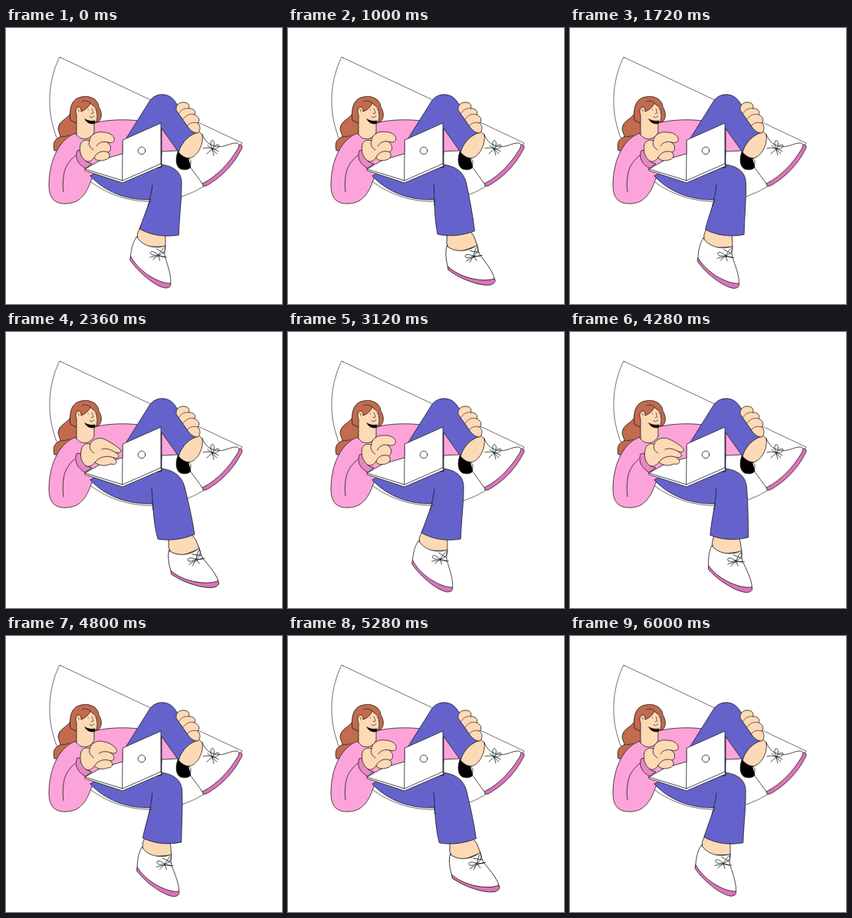
Recreate the animation shown at these times as an HTML page. Size 360 by 360 pixels, loop 6.04 s.

```html
<!DOCTYPE html>
<html lang="en">
<head>
<meta charset="utf-8">
<title>Working on a laptop</title>
<style>
  html, body { margin: 0; width: 100%; height: 100%; overflow: hidden; background: #fff; }
  svg { display: block; width: 100vw; height: 100vh; }
  path, circle { stroke: #111; stroke-width: .75; stroke-linejoin: round; stroke-linecap: round; }
  .white { fill: #fff; }
  .pink { fill: #fca4da; }
  .cuff { fill: #e985c6; }
  .sole { fill: #dd74ba; }
  .blue { fill: #6563cb; }
  .skin { fill: #fdd9b5; }
  .hair { fill: #c26b4e; }
  .ink { fill: #000; }
  .line { fill: none; }
  .thin { stroke-width: .6; }
</style>
</head>
<body>
<svg viewBox="0 0 360 360">
  <!-- seat -->
  <path class="white thin" d="M71 38.500L308 150A131 131 0 0 1 69 39.500Q69 37.500 71 38.500Z"/>

  <!-- sweater -->
  <path class="hair" d="M86 108C80 121 69 119 68 132C69 137 71 140 71 142C62 145 61 152 63 160L82 160L100 140V105Z"/>
  <path class="line thin" d="M71 142C75 141 79 142 82 140"/>
  <path class="pink" d="M92 137C72 142 56 170 56 205C56 226 68 230 80 229C98 228 106 214 112 196L200 196L203 161L224 160L228 150L205 124L172 121C160 119 132 119 115 124Z"/>

  <!-- head -->
  <path class="hair" d="M84 120C82 104 86 92 98 90C110 87 121 94 121 103C125 109 126 117 121 122L115 123L92 124Z"/>
  <path class="skin" d="M92 139V113C90 109 91 103 95 103C97 103 98 106 98 109C103 107 108 103 110 98C112 101 118 103 118 107L119 114C119 119 118 123 115 124V136C110 147 97 147 92 139Z"/>
  <path class="ink" d="M103 119C107 121 111 122 116 121L115.500 124.500C110 126 105 123 103 119Z"/>
  <path class="line thin" d="M112 105L114 111L111 111.500M109 116Q112 118 115 115M107 106L108 107M116 105.500L116.500 106.500M110 98C107 95 103 94 99 96M94 106Q96 107 95 109"/>

  <!-- hanging leg -->
  <g id="foot">
    <path class="skin" d="M176 256L171 268V285H207.500V272L204 260Z"/>
    <path class="sole" d="M162 297L161 302C166 309 172 317 182 325C190 332 200 338 207 339C212 339 215 337 214 333Z"/>
    <path class="white" d="M170 272C166 277 163 286 162 297C166 306 175 315 184 321.500C194 328 204 333 214 333C215 324 211 312 208 302C205 295 207 289 207.500 284C197 288 178 286 170 272Z"/>
    <path class="line" d="M198 296C191 289 187 291 188 294C190 297 195 296 198 296C202 291 205 286 207 286C208 291 203 295 198 296L191 302M198 296L206 299M187 299C193 297 202 297 209 299M198 296L200 303M196 288L206 294"/>
  </g>
  <path id="pants" class="blue"/>
  <path id="fold" class="line"/>

  <!-- raised leg -->
  <path class="sole" d="M305 152C309 153 309 156 306 160C297 178 281 195 261 206L257 206L256 202Z"/>
  <path class="white" d="M256 139C260 148 264 152 273 154C284 157 291 150 300 150C304 150 305 153 302 158C291 176 276 193 256 203C251 196 246 189 240 181C242 175 241 171 238 170C246 166 254 156 256 139Z"/>
  <path class="ink" d="M226 158C220 168 221 181 228 184C234 186 240 184 241 181L237 168Z"/>
  <path class="skin" d="M225 162C230 168 236 171 242 169C251 165 258 151 256 139L250 134L230 144Z"/>
  <path class="blue" d="M153 150L185 99C191 88 199 86 207 87C214 88 219 93 222 98L251 136C240 139 230 147 225 162L203 131V182H153Z"/>
  <path class="line" d="M269 158C265 150 268 145 270 147C273 150 271 154 269 158C274 151 278 151 278 154C277 157 273 158 269 158L262 164M269 158L271 166M257 157C263 155 271 157 277 161M263 153L275 164"/>

  <!-- hand holding the shin -->
  <path class="skin" d="M222 107C221 100 227 96 233 97C239 98 240 102 238 105C244 104 249 109 246 113C251 115 254 120 250 124C254 127 254 134 250 137C245 137 241 134 238 130Z"/>
  <path class="line thin" d="M238 105C233 104 228 107 226 111M246 113C240 111 234 114 231 119M250 124C244 122 239 124 236 128"/>

  <!-- laptop and typing hand -->
  <path class="white" d="M103 184L124 172L152 164L202 177L203 180L152 202L103 186Z"/>
  <path id="cuff" class="cuff"/>
  <path id="sleeve" class="line"/>
  <path id="hand" class="skin"/>
  <path id="fingers" class="line"/>
  <path class="white" d="M152.500 146L202 124V177L152 199Z"/>
  <path class="line" d="M103 184L152 199"/>
  <circle class="white" cx="177" cy="160" r="4.800"/>
</svg>
<script>
const LOOP = 6040, STEP = 40;
const SWING = LOOP / 4, TYPE = LOOP / 3;
const BACK = 50, FRONT = 835;

// Each part blends between two poses with matching numbers.
const legPoses = {
  pants: [
    'M110 193C130 215 160 225 189 224L185 232C181 243 177 253 174 262C190 271 208 273 225 270C226 245 229 225 229 202C229 187 218 180 202 178L150 175Z',
    'M110 193C130 215 160 225 191 224L192 232C193 246 195 259 198 270C214 273 232 270 246 264C243 243 238 222 233 202C229 187 218 180 202 178L150 175Z'
  ],
  fold: [
    'M191 205C190 214 188 222 185 232',
    'M190 204C191 214 191 222 192 232'
  ]
};
const armPoses = {
  cuff: [
    'M93 160C90 167 92 177 104 183L112 177C104 176 98 168 98 160Z',
    'M92 159C89 166 91 176 103 183L112 177C104 176 98 168 98 159Z'
  ],
  sleeve: [
    'M91 166C81 174 76 183 75 194C74 202 74 209 75 214',
    'M89 166C80 174 76 183 75 192C74 201 74 209 75 215'
  ],
  hand: [
    'M105 174C98 170 95 161 97 152C98 147 104 145 109 147C109 140 118 134 127 136C136 136 143 142 141 147C140 150 136 150 132 149C138 153 138 160 133 162C137 166 135 171 129 172C123 174 117 173 115 169C112 173 109 175 105 174Z',
    'M105 175C97 170 96 160 99 151C101 146 106 145 110 146C113 139 123 136 131 141C138 145 143 148 149 153C152 157 147 159 143 157C150 162 147 166 140 164C148 170 143 174 137 172C128 176 121 174 116 170C113 174 109 176 105 175Z'
  ],
  fingers: [
    'M109 147C107 151 109 156 114 159M132 149C126 147 120 150 118 154M133 162C126 159 118 162 115 169',
    'M110 146C108 150 110 155 115 158M143 157C136 153 130 151 125 153M140 164C132 160 121 163 116 170'
  ]
};
// Time within one typing cycle, reach of the fingers.
const reach = [[0, 0], [120, .05], [300, 1], [620, 1], [900, 0], [1107, -.2], [1253, 0], [TYPE, 0]];

const el = id => document.getElementById(id);
const ease = p => (1 - Math.cos(Math.PI * p)) / 2;
const mix = (a, b, p) => a + (b - a) * p;

function blend([from, to], p) {
  const ends = to.match(/-?[\d.]+/g);
  let i = 0;
  return from.replace(/-?[\d.]+/g, n => mix(+n, +ends[i++], p).toFixed(2));
}

function sample(table, t) {
  const i = table.findIndex(k => k[0] > t);
  const [a, b] = [table[i - 1], table[i]];
  return mix(a[1], b[1], ease((t - a[0]) / (b[0] - a[0])));
}

function swing(t) {
  const u = (t - BACK + LOOP) % SWING, rise = FRONT - BACK;
  return u < rise ? ease(u / rise) : 1 - ease((u - rise) / (SWING - rise));
}

function pose(parts, p) {
  for (const id in parts) el(id).setAttribute('d', blend(parts[id], p));
}

function draw(t) {
  const s = swing(t);
  pose(legPoses, s);
  pose(armPoses, sample(reach, t % TYPE));
  el('foot').setAttribute('transform', `rotate(${-22.5 * s} 224 171)`);
}

const start = performance.now();
function tick() {
  const t = (performance.now() - start) % LOOP;
  draw(Math.floor(t / STEP) * STEP);
  requestAnimationFrame(tick);
}
tick();
</script>
</body>
</html>
```
